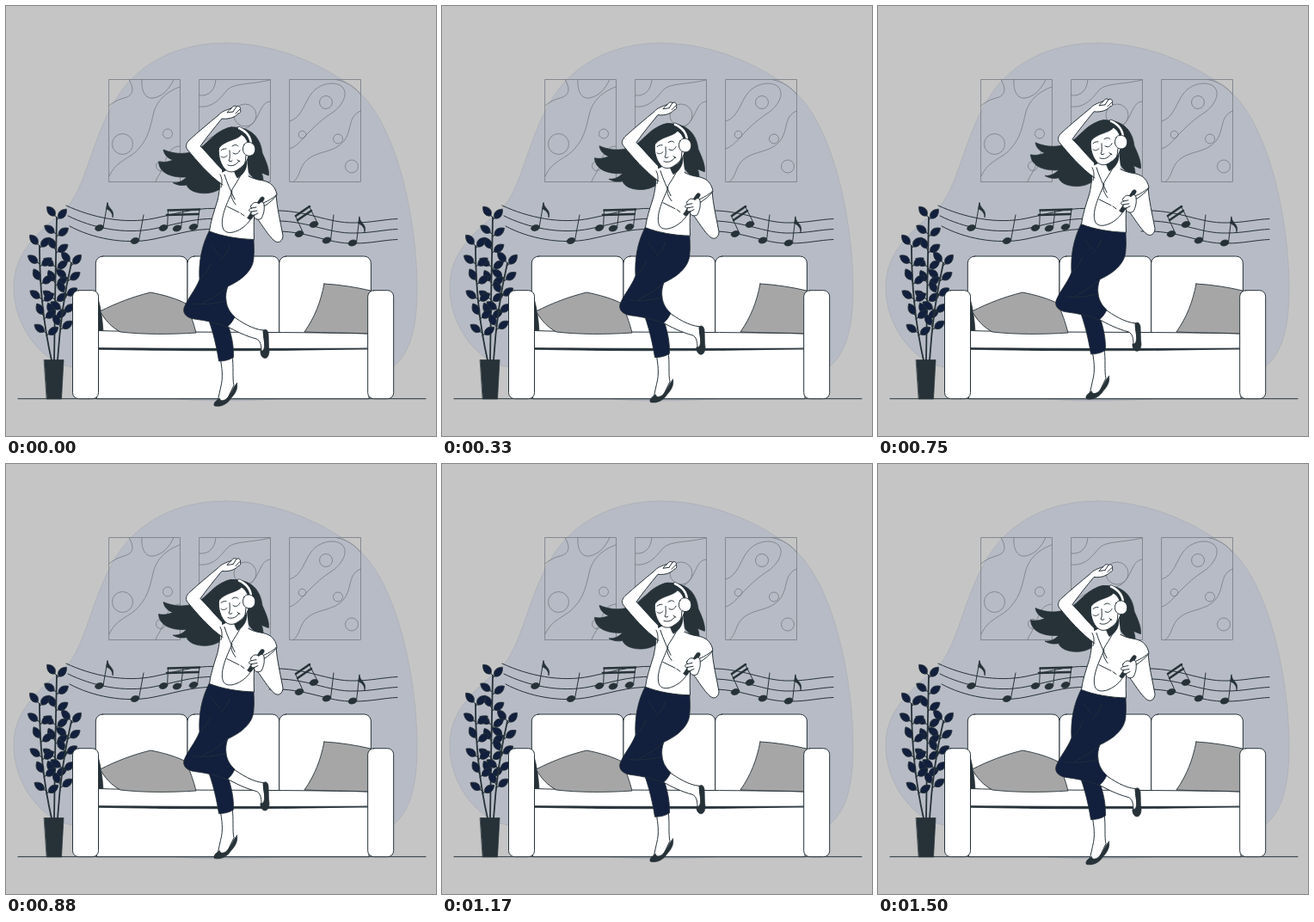
Animation, 500 px wide and 500 px high, one loop 1.54 s. Source, as an HTML page:

```html
<!DOCTYPE html>
<html lang="en">
<head>
<meta charset="utf-8">
<title>Dancing at home</title>
<style>
  html, body { margin: 0; width: 100%; height: 100%; overflow: hidden; background: #c5c5c5; }
  svg { display: block; width: 100vw; height: 100vh; }
  .w { fill: #fff; stroke: #263238; stroke-width: 1; }
  .d { fill: #263238; stroke: #263238; stroke-width: .7; }
  .n { fill: #121f3d; stroke: #263238; stroke-width: .8; }
  .l { fill: none; stroke: #263238; stroke-width: 1; }
  .a { fill: none; stroke: #747a82; stroke-width: .8; }
  .g { fill: #a6a6a6; stroke: #263238; stroke-width: .9; }
  path, line, rect { stroke-linejoin: round; stroke-linecap: round; }
</style>
</head>
<body>
<svg viewBox="0 0 500 500">
  <rect width="500" height="500" fill="#c5c5c5"/>
  <path fill="#b7bbc5" stroke="#a0a5ae" stroke-width=".5" d="M255 43C314 43 370 68 409 99C453 136 478 245 478 328C478 372 471 402 451 419C400 458 300 459 245 459C170 459 110 445 78 420C40 415 9 370 9 328C8 285 42 260 68 237C92 215 98 160 125 113C149 70 195 43 255 43Z"/>

  <g class="a">
    <rect x="120" y="85.500" width="82.500" height="119"/>
    <path d="M143 85.500C151 99 146 105 137 107C130 109 124 112 120 116M158 85.500C157 99 162 108 171 107C183 105 190 96 195 85.500M202 94C184 101 176 111 172 123C168 139 166 153 155 165C145 178 128 179 120 198M202 163C187 164 187 179 181 191C178 197 175 200 174 204.500"/>
    <circle cx="135.500" cy="160.500" r="12"/><circle cx="188" cy="148.500" r="5.500"/><circle cx="180" cy="186" r="5.500"/>
    <rect x="225" y="85.500" width="82.500" height="119"/>
    <path d="M225 104C235 105 243 99 244 85.500M225 117C241 119 250 106 256 99C264 89 282 92 307 86M307 111C293 112 296 137 277 143C257 150 237 146 225 164"/>
    <circle cx="278" cy="127" r="13"/>
    <rect x="330" y="85.500" width="82.500" height="119"/>
    <path d="M330 134C344 130 347 112 355 102C365 89 383 87 391 94C399 103 390 116 381 123C367 132 360 139 352 147C344 155 339 163 330 166M384 85.500C396 88 406 94 412.500 103M412.500 122C397 128 403 144 393 157C382 171 362 168 350 179C341 187 342 199 334 204.500"/>
    <circle cx="372" cy="112" r="7.500"/><circle cx="386" cy="154.500" r="5.500"/><circle cx="344.500" cy="149.500" r="4.300"/><circle cx="402" cy="186.500" r="7.500"/>
  </g>

  <g id="music"></g>

  <path class="l" d="M14 456.700H488"/>
  <g id="plant"></g>
  <path class="d" d="M44.500 411.500H67L64.500 457H47.500Z"/>

  <g class="w">
    <rect x="104.300" y="291" width="106.700" height="100" rx="8"/>
    <rect x="211" y="291" width="106.700" height="100" rx="8"/>
    <rect x="317.700" y="291" width="106.700" height="100" rx="8"/>
    <path class="d" d="M105 334C109 345 112 360 113 379H105Z"/>
    <path d="M107 377.500C180 380 330 378.500 421 381V400H107Z"/>
    <path class="g" d="M109.500 355C129 345 148 338 168 333C184 336 200 341 209 346C214 357 218 368 221 380C190 382 160 382 133 379C122 373 115 365 109.500 355Z"/>
    <path class="g" d="M370 323C388 324 407 327 424 331V381C400 380 370 380 347 379C359 362 366 344 370 323Z"/>
    <rect x="106" y="399" width="316" height="57.700"/>
    <path class="d" d="M107 397.500C200 398.500 330 398.500 421 398C350 401.500 180 401.500 107 399Z"/>
    <rect x="77.500" y="330.700" width="30" height="126" rx="7"/>
    <rect x="420.700" y="330.700" width="30" height="126" rx="7"/>
  </g>

  <g id="girl">
    <!-- hair -->
    <path class="d" d="M262 141C247 144 241 152 233 159C220 172 202 175 183 167C184 173 188 177 194 179C187 182 182 182 177.500 181C178 194 192 200 210 199C205 204 200 206 194 205.500C200 209 206 209 210 208C213 218 236 222 250 212C254 205 253 195 258 190L280 188C283 198 291 204 299 203C299 199 298 196 297 194C301 195 304 197 305.500 197C306 188 302 180 298 171C296 153 285 140 262 141Z"/>
    <!-- standing leg -->
    <path class="w" d="M249 408C251 421 253 431 249.500 444L246 460L256 460L265 441C263 433 265 419 263 406Z"/>
    <path class="d" d="M268.500 438.500C270 447 265 452 261 457C257 463 250 466.500 242.500 465C240.500 462 244 459 248.500 456C249 460 253 459 256 457C261 453 263 445 268.500 438.500Z"/>
    <path class="n" d="M230 350C238 369 244 390 247.500 413C253 413 259 412 264.500 408.500C265 394 262 381 256 364L252 345Z"/>
    <!-- raised foot -->
    <path class="w" d="M263 360C274 368 287 376 299 377L302 402L297 402C297 395 296 389 291 387C279 384 267 378 256 372Z"/>
    <path class="d" d="M299.500 377C302 375 304.500 377 305 381C305.500 388 305 394 306 401C306 406 304 409.500 301 409.500C297.500 409 295.500 405 296 401C299.500 402 301 398 300.500 391C300 385 298.500 381 299.500 377Z"/>
    <!-- trousers -->
    <path class="n" d="M237 260C227 279 224 298 225 318C220 331 211 340 207 351C205 358 211 363 219 364C233 366 245 368 257 373.500C261 370 264 366 266 361.500C261 357 257 351 256 343C255 337 256 331 258 326C276 318 288 306 288 292C289 284 288 277 288 270Z"/>
    <path d="M240 279C244 285 247 289 249 291M260 279C258 286 254 291 249 296M225 318C231 313 235 307 238 300M258 326C246 337 237 341 228 346M256 343C244 346 229 348 218 346" fill="none" stroke="#263238" stroke-width=".8"/>
    <!-- right arm -->
    <path class="w" d="M314 219C315 235 319 250 322 267C322 273 317 277 312 273C305 267 298 255 292 247L300 233L297 213Z"/>
    <!-- top -->
    <path class="w" d="M250 194C249 208 248 217 246 226C242 239 238 250 236.500 262C252 268 270 271 288.500 271.500C288 257 288 244 290 232C301 229 309 225 315 219C313 210 308 205 299 203C290 202 283 199 277 195L258 190Z"/>
    <!-- raised arm -->
    <path class="w" d="M252 208C236 197 221 179 211 167C208 163 210 159 213 156C224 146 236 136 247 127C250 123 256 121 262 119C264 116 266 115.500 268 117C271 115 273 118 272.500 120.500C273.500 123 272 125 270 125C267 129 260 132 251 131C242 142 233 153 226 163C235 172 243 182 251 190"/>
    <path class="l" d="M249 196C251 200 252 204 250 211M262 119C260 121 258 122 257 124L264 123M268 117L264 123M272 120L267 125"/>
    <!-- neck and head -->
    <path fill="#fff" d="M264 188L280 174L282 197C276 207 261 207 256 194Z"/>
    <path class="d" d="M265 191C272 191 277 186 280 179C281 189 276 196 269 200C267 197 266 194 265 191Z"/>
    <path class="w" d="M248 162C246 170 248 182 254 189C258 194 265 194 270 190C278 185 283 177 283 167C282 157 277 148 268 148C258 150 251 155 248 162Z"/>
    <path class="d" d="M246 168C249 161 257 158 265 155C271 153 274 150 276 147C282 153 283 160 284 166L287 162C286 150 276 141 262 141C250 142 242 154 246 168Z"/>
    <path class="l" d="M250 175C252 177 255 176 257 174M264 171C267 173 270 172 272 168M250 168C252 166 254 166 256 166M263 163C266 161 268 161 270 163M260 168C260 173 261 177 259 180C260 181 262 181 263 180M258 185C263 187 268 185 271 180M269 179L272 181"/>
    <path d="M271 142C280 146 285 153 285 162" fill="none" stroke="#263238" stroke-width="4"/>
    <path d="M271 142C280 146 285 153 285 162" fill="none" stroke="#fff" stroke-width="2.600"/>
    <path class="w" d="M277 161C278 158.500 283 157.500 286 159.500C290.500 162 291 169 287.500 172.500C284 175.500 278.500 174.500 276.500 170.500C275 168 275 164 277 161Z"/>
    <path class="l" d="M279 174C278 190 272 199 265 210C260 217 261 223 267 231M254 196C257 206 262 216 266 225M263 216C255 233 248 250 253 260C259 269 279 259 285 247M257 233L271 240M273 241L277 244M300 233C306 229 311 225 315 220"/>
    <!-- phone and hand -->
    <path class="d" d="M281 246L296 223C298 221 301 222 300 225L286 247C284 249 281 248 281 246Z"/>
    <path class="w" d="M285 232C288 227 292 228 294 230C297 226 300 228 300 231C301 238 299 243 297 247C293 250 287 247 289 243C285 244 284 241 286 239C282 240 281 236 286 235C284 235 284 233 285 232Z"/>
    <path class="l" d="M286 235L291 234M286 239L292 238M289 243L293 241"/>
  </g>
</svg>
<script>
const el = id => document.getElementById(id);
const line = d => `<path class="l" d="${d}"/>`;
const beam = d => `<path d="${d}" fill="none" stroke="#263238" stroke-width="2.6"/>`;
const flag = (x, y) => `<path class="d" d="M${x} ${y}c1 7 9 8 6 17c0-6-4-9-7-10z"/>`;

// Note head at x, y with a stem up to sx, sy
const note = (x, y, sx, sy) =>
  `<ellipse class="d" cx="${x}" cy="${y}" rx="5" ry="3.3" transform="rotate(-18 ${x} ${y})"/>` +
  line(`M${x + 4.6} ${y - 1}L${sx} ${sy}`);

let music = '';
for (let i = 0; i < 3; i++) {
  const y = i * 12;
  music += line(`M${70 + i * 2} ${232 + y}C100 ${246 + y} 138 ${254 + y} 172 ${247 + y}S222 ${233 + y} 258 ${236 + y}`);
  music += line(`M306 ${238 + y}C349 ${236 + y} 374 ${253 + y} 405 ${252 + y}C425 ${252 + y} 440 ${248 + y} 455 ${247.5 + y}`);
}
music += note(108.500, 258, 118, 229) + flag(118, 229)
  + note(150, 273, 160, 243)
  + note(183, 258, 188.500, 237) + note(199, 258.500, 206, 237) + note(218, 257, 225, 236)
  + beam('M188.500 237.500L225 236.500') + beam('M187 243L223.500 242')
  + note(341, 265, 336.500, 244) + note(358, 254, 352.500, 233)
  + beam('M337 244L353 233') + beam('M339 249L355 238')
  + note(373, 272.5, 381, 243)
  + note(403, 275.5, 411, 245) + flag(411, 246);
el('music').innerHTML = music;

const leaf = (x, y, a, flip) =>
  `<path class="n" transform="translate(${x.toFixed(1)} ${y.toFixed(1)}) scale(${flip} 1) rotate(${a})" d="M0 0L3 0C6-6 12-6 17-1C12 5 6 5 3 0Z"/>`;

// Curved stem with leaf pairs from the tip downwards
function stem(x0, y0, cx, cy, x1, y1, pairs, end) {
  let s = `<path d="M${x0} ${y0}Q${cx} ${cy} ${x1} ${y1}" fill="none" stroke="#263238" stroke-width="1.8"/>`;
  for (let i = 0; i < pairs; i++) {
    const t = 1 - i * end / pairs, u = 1 - t;
    const x = u * u * x0 + 2 * u * t * cx + t * t * x1;
    const y = u * u * y0 + 2 * u * t * cy + t * t * y1;
    const a = i ? 32 : 45;
    s += leaf(x, y + 3, -a, 1) + leaf(x, y, i % 2 ? -a : a - 90, -1);
  }
  return s;
}
el('plant').innerHTML =
  stem(56, 412, 57, 330, 59, 246, 7, .8) +
  stem(53, 412, 39, 350, 39, 279, 6, .9) +
  stem(60, 412, 64, 350, 76, 299, 5, .85);

const LOOP = 1540, PEAK = 690, RISE = 10, REST = 1.04;
const girl = el('girl');
function draw(ms) {
  const d = Math.abs(ms % LOOP - PEAK);
  const away = Math.min(d, LOOP - d) / (LOOP / 2);
  girl.setAttribute('transform', `translate(0 ${(REST - RISE * (1 - away)).toFixed(3)})`);
}
const start = performance.now();
function tick(now) {
  draw(Math.max(0, now - start));
  requestAnimationFrame(tick);
}
draw(0);
requestAnimationFrame(tick);
</script>
</body>
</html>
```
